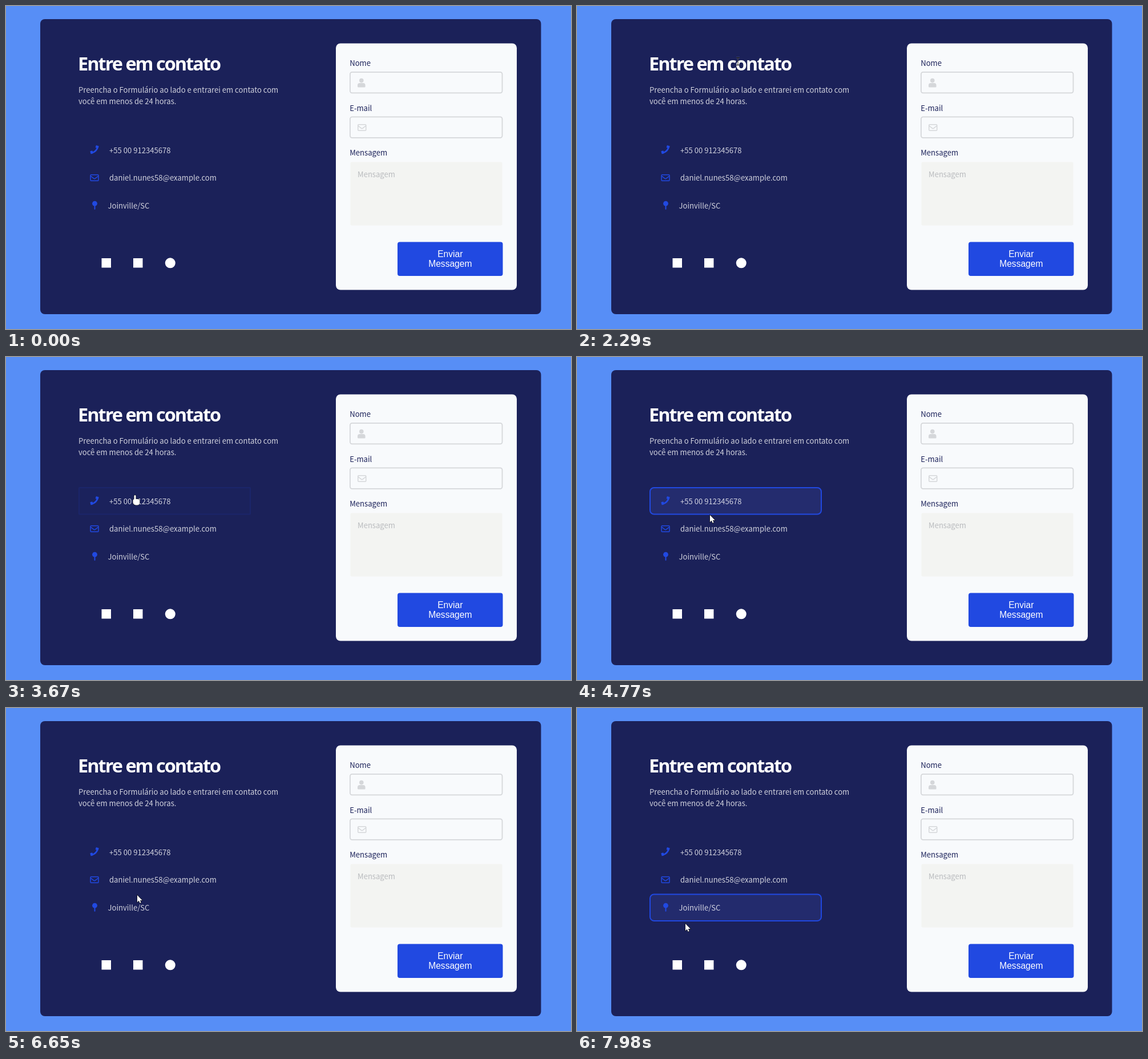
These frames come from a looping animation (990 px wide and 566 px high, 8 s). An HTML page with a canvas:

```html
<!DOCTYPE html>
<html lang="pt-BR">
<head>
<meta charset="utf-8">
<title>Entre em contato</title>
<style>
  html, body { margin: 0; width: 100%; height: 100%; overflow: hidden; background: #578ef6; }
  canvas { display: block; width: 990px; height: 566px; }
</style>
</head>
<body>
<canvas id="stage" width="990" height="566"></canvas>
<script>
const ctx = document.getElementById('stage').getContext('2d');
const LOOP = 8000, FADE = 500;
const NAVY = '#1b2159', BLUE = '#2149e1', GREY = '#d5d7da', SOFT = 'rgba(255,255,255,.8)';
const SANS = '300 13.1px "Noto Sans CJK JP", "Noto Sans CJK SC", "Noto Sans", sans-serif';
const TITLE = 'bold 32.5px "Open Sans", "Noto Sans", sans-serif';
const BUTTON = '15.6px "Liberation Sans", Arial, sans-serif';

// Contact rows are entered at an even pace and left as the pointer moves on
const rows = [
  { label: '+55 00 912345678', x: 181, leave: 4760, icon: phone },
  { label: 'daniel.nunes58@example.com', x: 181, leave: 6130, icon: y => envelope(147.3, y - 6, BLUE) },
  { label: 'Joinville/SC', x: 178.5, leave: 7965, icon: pin }
].map((row, i) => ({ ...row, y: 228 + 48.7 * i, enter: 3570 + 1545 * i }));

// Turning points of the pointer
const stops = [
  { t: 230, x: 619, y: 564 }, { t: 480, x: 488, y: 515 }, { t: 1030, x: 430, y: 286 },
  { t: 1600, x: 160, y: 146 }, { t: 2060, x: 333, y: 122 }, { t: 2290, x: 282, y: 97 },
  { t: 2680, x: 219, y: 142 }, { t: 3670, x: 226, y: 242 }, { t: 4770, x: 233, y: 277 },
  { t: 6650, x: 230, y: 328 }, { t: LOOP, x: 189, y: 379 }
];

function box(x, y, w, h, r, fill) {
  ctx.beginPath();
  ctx.roundRect(x, y, w, h, r);
  ctx.fillStyle = fill;
  ctx.fill();
}

function frame(x, y, w, h, r, color, line = 1.8) {
  ctx.beginPath();
  ctx.roundRect(x, y, w, h, r);
  ctx.strokeStyle = color;
  ctx.lineWidth = line;
  ctx.stroke();
}

function disc(x, y, r, fill) {
  ctx.beginPath();
  ctx.arc(x, y, r, 0, 7);
  ctx.fillStyle = fill;
  ctx.fill();
}

function text(str, x, y, fill, font = SANS, align = 'left', spacing = '0px') {
  ctx.font = font;
  ctx.textAlign = align;
  ctx.letterSpacing = spacing;
  ctx.fillStyle = fill;
  ctx.fillText(str, x, y);
}

// Icons take the middle line of their row
function phone(y) {
  ctx.save();
  ctx.translate(155.3, y - 0.3);
  ctx.rotate(Math.PI / 4);
  ctx.beginPath();
  ctx.arc(-10.6, 0, 13, -0.65, 0.65);
  ctx.strokeStyle = BLUE;
  ctx.lineWidth = 2.8;
  ctx.stroke();
  for (const side of [-1, 1]) {
    ctx.save();
    ctx.scale(1, side);
    ctx.translate(-0.6, 6.8);
    ctx.rotate(0.5);
    box(-2.6, -2.2, 5.2, 4.4, 0.8, BLUE);
    ctx.restore();
  }
  ctx.restore();
}

function envelope(x, y, color) {
  frame(x + 0.75, y + 0.75, 14, 10.5, 1.3, color, 1.5);
  ctx.beginPath();
  ctx.moveTo(x + 1, y + 3);
  ctx.lineTo(x + 6.4, y + 7.2);
  ctx.quadraticCurveTo(x + 7.75, y + 8.2, x + 9.1, y + 7.2);
  ctx.lineTo(x + 14.5, y + 3);
  ctx.stroke();
}

function pin(y) {
  disc(155.5, y - 3.5, 4.4, BLUE);
  box(154.5, y, 2, 7, [0, 0, 1, 1], BLUE);
}

const smooth = u => {
  u = Math.min(1, Math.max(0, u));
  return u * u * (3 - 2 * u);
};

function drawRow(row, t) {
  const level = smooth((t - row.enter) / FADE) * (1 - smooth((t - row.leave) / FADE));
  const mid = row.y + 24.3;
  ctx.globalAlpha = level;
  box(127, row.y, 302, 48.5, 8 * level, '#242c6e');
  frame(128, row.y + 1, 300, 46.5, 7 * level, BLUE, 2);
  ctx.globalAlpha = 1;
  row.icon(mid);
  text(row.label, row.x, mid + 5.2, SOFT);
}

function drawIntro() {
  text('Entre em contato', 126, 113.2, '#fff', TITLE, 'left', '-2px');
  text('Preencha o Formulário ao lado e entrarei em contato com', 127, 152, SOFT);
  text('você em menos de 24 horas.', 127, 172, SOFT);
  box(167.5, 442, 16.5, 16.5, 0, '#fff');
  box(223, 442, 16.5, 16.5, 0, '#fff');
  disc(287.8, 450.3, 9, '#fff');
}

function drawForm() {
  box(578, 65.5, 317, 432, 8, '#f8fafc');
  ['Nome', 'E-mail', 'Mensagem'].forEach((label, i) => {
    const y = 105 + 78.5 * i;
    text(label, 602.2, y, NAVY);
    if (i < 2) frame(602.9, y + 10.9, 266.6, 36.4, 3.5, GREY);
  });
  disc(622.8, 130.6, 3.8, GREY);
  box(616, 135, 13.6, 7.4, [4, 4, 1.5, 1.5], GREY);
  envelope(616, 207, GREY);
  box(603.5, 273.5, 266, 111, 2, '#f3f4f2');
  text('Mensagem', 616, 300, '#b9bbbe');
  box(686, 413.6, 184.5, 59.4, 4, BLUE);
  text('Enviar', 778.3, 440, '#fff', BUTTON, 'center');
  text('Messagem', 778.3, 457, '#fff', BUTTON, 'center');
}

// Smooth curve through the stops
function pointer(t) {
  const i = stops.findIndex(s => s.t > t) - 1;
  const a = stops[i], b = stops[i + 1];
  const before = stops[i - 1] || a, after = stops[i + 2] || b;
  const span = b.t - a.t, u = (t - a.t) / span;
  const along = k => {
    const ma = (b[k] - before[k]) / (b.t - before.t) * span;
    const mb = (after[k] - a[k]) / (after.t - a.t) * span;
    return a[k] + (b[k] - a[k]) * smooth(u) + u * (1 - u) * (ma * (1 - u) - mb * u);
  };
  return [Math.round(along('x')), Math.round(along('y'))];
}

function arrow() {
  const p = new Path2D('M0 0V12.2L2.8 9.6 4.6 13.8 6.6 13 4.9 8.9H8.7Z');
  outlined(p);
}

function hand() {
  const p = new Path2D();
  p.roundRect(-1.5, 0, 3, 11, 1.5);
  p.roundRect(-3.5, 7, 11.5, 10.5, [3, 3, 4, 5]);
  outlined(p);
}

function outlined(p) {
  ctx.strokeStyle = '#111';
  ctx.lineWidth = 1.2;
  ctx.stroke(p);
  ctx.fillStyle = '#fff';
  ctx.fill(p);
}

function beam() {
  const p = new Path2D('M-3-6.5H3M0-6.5V6.5M-3 6.5H3');
  for (const [color, width] of [['rgba(255,255,255,.3)', 2], ['#111', 1]]) {
    ctx.strokeStyle = color;
    ctx.lineWidth = width;
    ctx.stroke(p);
  }
}

function drawPointer(t) {
  if (t < stops[0].t) return;
  const [x, y] = pointer(t);
  const overText = x > 126 && x < 480 && ((y > 84 && y < 122) || (y > 136 && y < 177));
  const overRow = rows.some(r => t >= r.enter && t < r.leave);
  ctx.save();
  ctx.translate(x, y);
  if (overText) beam();
  else if (overRow) hand();
  else arrow();
  ctx.restore();
}

function draw(t) {
  ctx.fillStyle = '#578ef6';
  ctx.fillRect(0, 0, 990, 566);
  box(60, 23, 877.5, 517, 8, NAVY);
  drawIntro();
  rows.forEach(row => drawRow(row, t));
  drawForm();
  drawPointer(t);
}

const start = performance.now();
function tick() {
  draw((performance.now() - start) % LOOP);
  requestAnimationFrame(tick);
}
tick();
</script>
</body>
</html>
```
